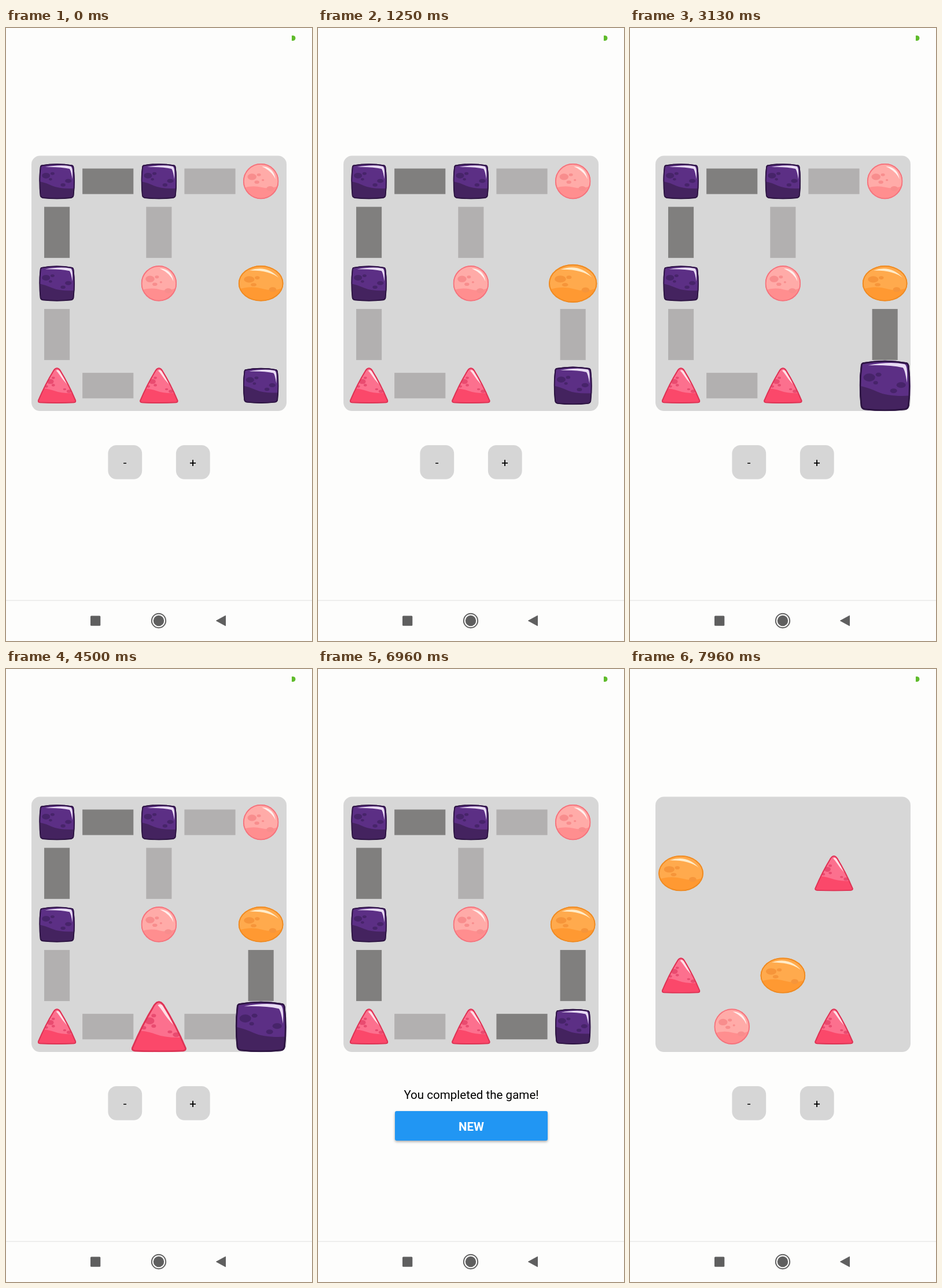
Write an HTML page that moves like this. It is 529 px wide and 1058 px high and loops after 8000 ms.

```html
<!DOCTYPE html>
<html lang="en">
<head>
<meta charset="utf-8">
<title>Bridge puzzle</title>
<style>
  html, body { margin: 0; width: 100%; height: 100%; overflow: hidden; background: #fdfdfc; }
  svg { display: block; width: 100%; height: 100%; }
  text { font: 20.57px Roboto, sans-serif; text-anchor: middle; }
  #new { font-weight: 700; fill: #fff; }
  #win rect { filter: drop-shadow(0 2px 2px #0005); }
</style>
</head>
<body>
<svg viewBox="0 0 529 1058">
  <defs id="shapes"></defs>
  <path d="M494 13h2a4.5 4.5 0 0 1 0 9h-2z" fill="#5fbb2b"/>

  <rect x="44" y="220.5" width="441" height="440.5" rx="14.7" fill="#d7d7d7"/>
  <g id="puzzle"></g>
  <g id="nextPuzzle"></g>

  <g id="controls">
    <g fill="#d6d6d6">
      <rect x="176.4" y="720" width="58.8" height="58.8" rx="14.7"/>
      <rect x="293.9" y="720" width="58.8" height="58.8" rx="14.7"/>
    </g>
    <text x="205.7" y="757">-</text>
    <text x="323.2" y="757">+</text>
  </g>
  <g id="win">
    <text x="265" y="742">You completed the game!</text>
    <rect x="133" y="763" width="264" height="51" rx="3" fill="#2196f3"/>
    <text id="new" x="265" y="796.5">NEW</text>
  </g>

  <path d="M0 988h529" stroke="#dfdfdf" stroke-width="1.2"/>
  <g fill="#5f5f5f">
    <rect x="146" y="1014.5" width="17.3" height="17.3" rx="1.5"/>
    <circle cx="264" cy="1023" r="12.2" fill="none" stroke="#5f5f5f" stroke-width="1.9"/>
    <circle cx="264" cy="1023" r="9.2"/>
    <path d="M363.5 1023L379.5 1014.3V1031.7Z" stroke="#5f5f5f" stroke-linejoin="round"/>
  </g>
</svg>

<script>
const LOOP = 8000, CELL = 88.15, GROW = 300, LINK_DELAY = 310;
const WIN_AT = 6480, RESET_AT = 7450;
const $ = id => document.getElementById(id);

const ellipsePath = (rx, ry) => `M${-rx} 0A${rx} ${ry} 0 0 1 ${rx} 0A${rx} ${ry} 0 0 1 ${-rx} 0Z`;

// Each sweet is centred on 0,0 and 88 units tall; spots are [x, y, rx, ry].
const sweets = {
  square: {
    body: 'M-38-40Q0-47 38-40Q42-38 42-32Q46 0 42 35Q41 41 35 42Q0 46-35 42Q-41 41-42 35Q-46 0-42-32Q-42-39-38-40Z',
    upper: 'M-50-50H50V17Q8 20-12 11T-50-1Z',
    shine: 'M-29-35Q8-42 34-37Q40-35 38-5Q35-27 31-31Q8-36-29-35Z',
    colors: ['#2d1542', '#44235f', '#5c2f85', '#47246a', '#e9dcf4'],
    spots: [[-27, -14, 10, 7], [-11, -19, 5, 3.5], [-16, -5, 4, 3], [28, -1, 8, 5], [15, 9, 6, 4]]
  },
  triangle: {
    body: 'M-9-38Q0-50 9-38Q30-4 47 36Q49 42 42 43Q0 45-42 43Q-49 42-47 36Q-30-4-9-38Z',
    upper: 'M-60-50H60V17Q18 22-6 13T-60 8Z',
    shine: 'M-2-37Q3-41 7-35Q17-19 25-3Q15-13 6-27Q2-33-2-37Z',
    colors: ['#dc3455', '#fb486a', '#fc708e', '#e94b70', '#ffe0e6'],
    spots: [[-16, -10, 8, 6], [-9, -19, 4, 3], [-26, 2, 4, 3], [-9, -1, 4, 3], [30, 14, 6, 4], [19, 9, 4, 2.5]]
  },
  circle: {
    body: ellipsePath(44, 44),
    upper: 'M-50-50H50V6Q28 22 2 15T-50 19Z',
    shine: 'M2-37Q31-36 36-5Q28-25 2-37Z',
    colors: ['#f4737d', '#ff8e8f', '#ffaba8', '#f88d8d', '#fff0ee'],
    spots: [[-22, -11, 11, 8], [-5, -16, 5, 3.5], [-10, 2, 6, 4], [5, -3, 3, 2.5], [23, 18, 9, 6]]
  },
  oval: {
    body: ellipsePath(55.5, 44),
    upper: 'M-60-50H60V8Q34 22 4 13T-60 16Z',
    shine: 'M-28-32Q14-47 44-14Q20-33-28-32Z',
    colors: ['#ee8a22', '#ff9932', '#ffaa4d', '#f6953a', '#ffecc9'],
    spots: [[-29, -10, 13, 8], [-9, -14, 6, 4], [-18, 3, 7, 4], [29, 15, 9, 6]]
  }
};

$('shapes').innerHTML = Object.entries(sweets).map(([name, { body, upper, shine, colors, spots }]) => {
  const [rim, low, high, spot, light] = colors;
  const dots = spots.map(([x, y, rx, ry]) =>
    `<ellipse cx="${x}" cy="${y}" rx="${rx}" ry="${ry}"/>`).join('');
  return `<clipPath id="${name}Clip"><path d="${body}"/></clipPath>
    <g id="${name}"><g clip-path="url(#${name}Clip)">
      <path d="${body}" fill="${low}"/><path d="${upper}" fill="${high}"/>
      <g fill="${spot}">${dots}</g>
      <path d="${body}" fill="none" stroke="${rim}" stroke-width="5.5"/>
      <path d="${shine}" fill="${light}"/>
    </g></g>`;
}).join('');

const tiles = {
  topLeft: ['square', 0, 0], topMid: ['square', 2, 0], topRight: ['circle', 4, 0],
  left: ['square', 0, 2], middle: ['circle', 2, 2], right: ['oval', 4, 2],
  lowLeft: ['triangle', 0, 4], lowMid: ['triangle', 2, 4], corner: ['square', 4, 4]
};
const nextTiles = [
  ['oval', 0, 1], ['triangle', 3, 1], ['triangle', 0, 3],
  ['oval', 2, 3], ['circle', 1, 4], ['triangle', 3, 4]
];

// [from, to, strength at the start]
const bridges = [
  ['topLeft', 'topMid', 2], ['topMid', 'topRight', 1], ['topLeft', 'left', 2],
  ['topMid', 'middle', 1], ['left', 'lowLeft', 1], ['lowLeft', 'lowMid', 1],
  ['right', 'corner', 0], ['lowMid', 'corner', 0]
];

// [first tile, tap time, second tile, tap time]
const moves = [
  ['right', 150, 'corner', 720],
  ['right', 1740, 'corner', 2250],
  ['corner', 2830, 'lowMid', 3250],
  ['corner', 3870, 'lowMid', 4200],
  ['lowLeft', 5270, 'left', 6170]
].map(([a, tapA, b, tapB]) => ({ a, b, taps: { [a]: tapA, [b]: tapB }, linkAt: tapB + LINK_DELAY }));

const centerX = col => 44 + CELL * (col + .5);
const centerY = row => 220.5 + CELL * (row + .5);
const ease = p => (p = Math.min(1, Math.max(0, p)), p * p * (3 - 2 * p));

function add(parent, tag, attributes) {
  const node = document.createElementNS('http://www.w3.org/2000/svg', tag);
  for (const key in attributes) node.setAttribute(key, attributes[key]);
  return parent.appendChild(node);
}

function addTile(parent, [shape, col, row]) {
  const node = add(parent, 'use', { href: '#' + shape });
  return scale => node.setAttribute('transform',
    `translate(${centerX(col)} ${centerY(row)}) scale(${scale})`);
}

const bridgeViews = bridges.map(([a, b, strength]) => {
  const [, colA, rowA] = tiles[a], [, colB, rowB] = tiles[b];
  const width = rowA === rowB ? CELL : CELL / 2, height = CELL * 1.5 - width;
  const node = add($('puzzle'), 'rect', {
    x: centerX((colA + colB) / 2) - width / 2,
    y: centerY((rowA + rowB) / 2) - height / 2,
    width, height
  });
  const links = moves.filter(m => [m.a, m.b].includes(a) && [m.a, m.b].includes(b));
  return { node, strength, links };
});
const tileViews = Object.entries(tiles).map(([name, tile]) => ({
  setScale: addTile($('puzzle'), tile),
  moves: moves.filter(m => name in m.taps).map(m => [m.taps[name], m.linkAt])
}));
nextTiles.forEach(tile => addTile($('nextPuzzle'), tile)(.7));

const show = (id, visible) => $(id).setAttribute('visibility', visible ? 'visible' : 'hidden');

function render(t) {
  for (const { setScale, moves } of tileViews) {
    setScale(moves.reduce((scale, [tap, release]) =>
      scale + .3 * (ease((t - tap) / GROW) - ease((t - release) / GROW)), .7));
  }
  for (const { node, strength, links } of bridgeViews) {
    const total = strength + links.filter(m => t >= m.linkAt).length;
    node.setAttribute('fill', ['none', '#b2b0b0', '#807f7e'][total]);
  }
  const won = t >= WIN_AT && t < RESET_AT;
  show('win', won);
  show('controls', !won);
  show('puzzle', t < RESET_AT);
  show('nextPuzzle', t >= RESET_AT);
}

const start = performance.now();
function tick() {
  render((performance.now() - start) % LOOP);
  requestAnimationFrame(tick);
}
tick();
</script>
</body>
</html>
```
